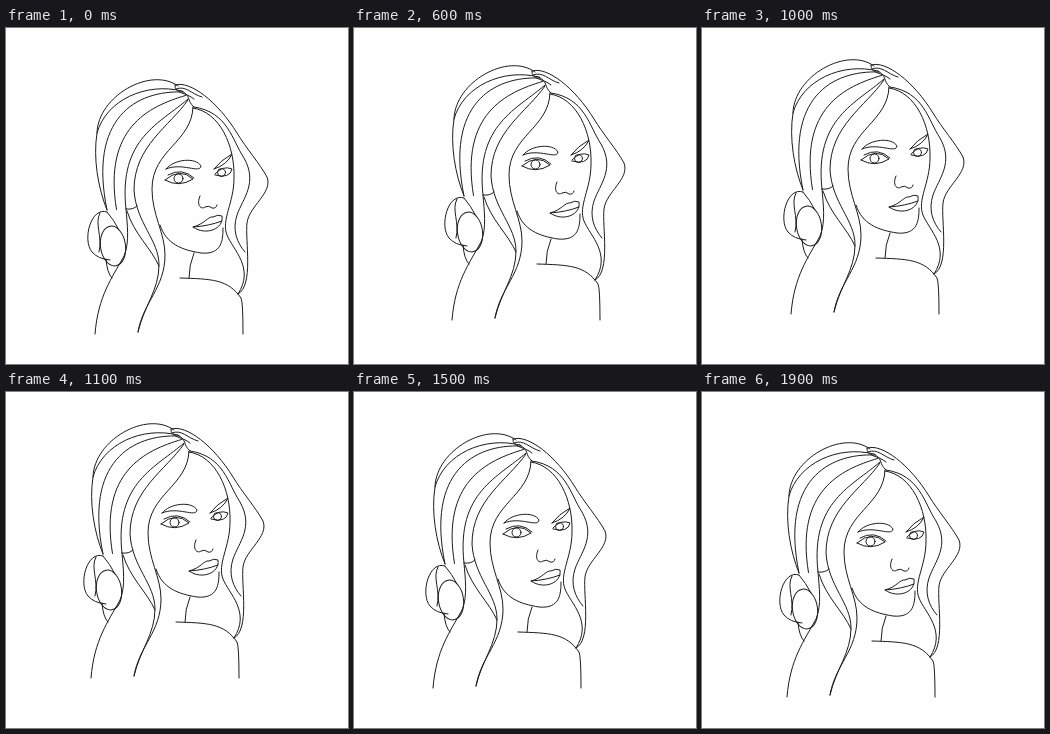
These frames come from a looping animation (342x336 px, 2 s). An HTML page:

```html
<!DOCTYPE html>
<html lang="en">
<head>
<meta charset="utf-8">
<title>Line portrait</title>
<style>
html, body { margin: 0; width: 100%; height: 100%; overflow: hidden; background: #fefefe; }
svg { display: block; width: 100vw; height: 100vh; }
path, ellipse { fill: none; stroke: #1c1c1c; stroke-width: 1; stroke-linecap: round; stroke-linejoin: round; }
</style>
</head>
<body>
<svg viewBox="0 0 342 336"><g id="portrait"></g></svg>
<script>
const portrait = document.getElementById('portrait');

function add(tag, attrs) {
  const el = document.createElementNS('http://www.w3.org/2000/svg', tag);
  for (const key in attrs) el.setAttribute(key, attrs[key]);
  portrait.append(el);
}
const line = d => add('path', { d });
const oval = (cx, cy, rx, ry, turn = 0) =>
  add('ellipse', { cx, cy, rx, ry, transform: `rotate(${turn} ${cx} ${cy})` });
const mix = (a, b, k) => a + (b - a) * k;

// Swept-back strands fan out between two bounding curves
function drawStrands(count) {
  for (let i = 0; i < count; i++) {
    const k = i / (count - 1);
    const at = (x0, y0, x1, y1) => `${mix(x0, x1, k)},${mix(y0, y1, k)} `;
    line('M' + at(177, 64, 182, 71) + 'C' + at(130, 62, 155, 95)
      + at(82, 90, 112, 110) + at(101, 182, 120, 181));
  }
}

function drawHair() {
  line('M101,182C92,160 87,130 91,105C92,68 145,38 172,58');
  line('M91,105C100,72 140,54 176,63');
  line('M169,57C168,66 180,64 188,71');
  line('M170,61C180,57 185,66 196,69');
  line('M176,63C186,69 180,72 188,79');
  drawStrands(3);
  // Nape
  line('M120,181Q127,182 131,178M121,183C128,206 145,220 153,238');
  // Front lock
  line('M182,72C164,98 128,118 128,162C130,195 153,212 153,237S138,278 132,304');
  line('M187,79C186,114 146,122 146,161C146,187 159,205 159,227C159,260 137,274 132,304');
  // Right side
  line('M169,57C184,52 212,74 231,105C240,120 254,136 261,149C267,165 243,178 241,195S248,258 232,266');
  line('M188,79C222,84 226,112 238,130C252,155 237,170 231,187C226,202 231,215 239,224');
  line('M187,80C214,84 229,118 228,150C228,175 215,192 221,207S249,240 232,266');
}

function drawBun() {
  line('M101,184C85,178 76,212 86,224Q92,231 104,232M101,184Q108,192 113,202');
  oval(107, 218, 12.5, 20, -8);
  line('M94,185C88,196 97,208 93,224M100,231Q101,245 106,250');
}

function drawBody() {
  line('M89,306C92,268 106,250 118,228C124,214 121,195 120,181');
  line('M188,225Q183,237 183,250M174,250C205,251 222,251 235,270Q237,274 237,306');
}

function drawFace() {
  line('M154,197C160,216 176,222 195,225C216,227 217,212 217,200');
  // Brows
  line('M160,141C168,131 190,129 195,138C194,146 176,134 160,141');
  line('M208,141Q215,132 226,126Q221,137 208,141');
  // Eyes
  line('M159,152Q174,139 187,151Q173,160 159,152M162,147Q176,139 188,150');
  oval(172.5, 150.5, 4.5, 4.5);
  line('M209,146Q217,137 226,141Q224,151 209,147');
  oval(215.5, 144.5, 4, 4);
  // Nose
  line('M194,168C190,177 195,182 199,179Q203,177 206,180Q210,181 211,177');
  // Lips
  line('M187,199C199,196 202,188 207,189Q212,186 216,188C218,201 200,208 187,199Q203,198 216,193');
}

drawHair();
drawBun();
drawBody();
drawFace();

const LOOP = 2000, STEP = 100, RADIUS = 10;
const start = performance.now();
const snap = v => Math.floor(v + 1e-6);

// Whole-pixel orbit, held for each step
function render(now) {
  const t = Math.floor(Math.max(0, now - start) % LOOP / STEP) * STEP;
  const angle = t / LOOP * 2 * Math.PI;
  const x = snap(RADIUS * Math.sin(angle));
  const y = snap(RADIUS * (Math.cos(angle) - 1));
  portrait.setAttribute('transform', `translate(${x} ${y})`);
  requestAnimationFrame(render);
}
render(start);
</script>
</body>
</html>
```
